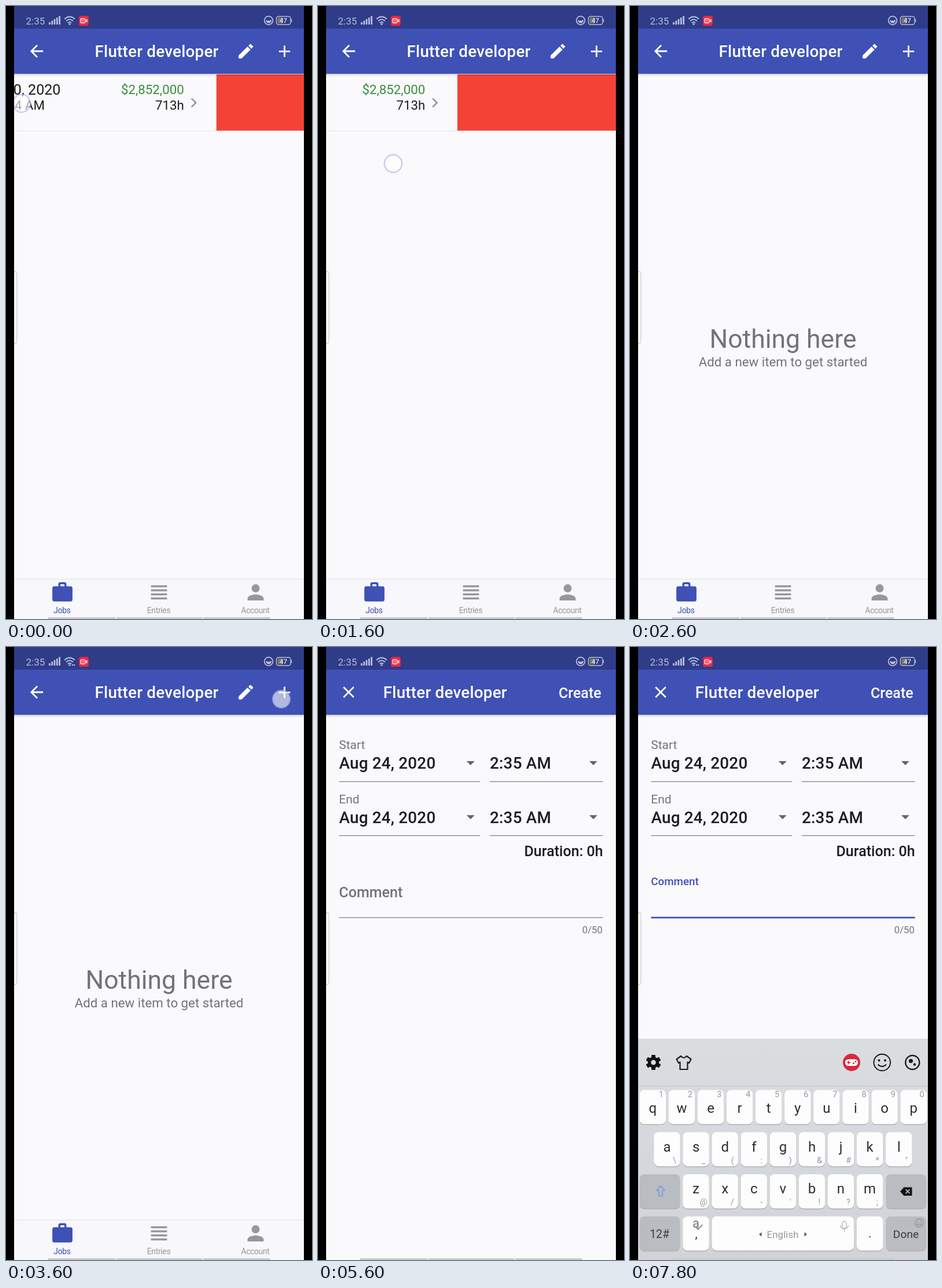
An HTML page for the animation above (8 s loop, 529 px wide and 1058 px high).

```html
<!DOCTYPE html>
<html lang="en">
<head>
<meta charset="utf-8">
<title>Job entries</title>
<style>
html, body { margin: 0; width: 100%; height: 100%; overflow: hidden; background: #000; }
svg { display: block; width: 100vw; height: 100vh; font-family: Roboto, sans-serif; }
</style>
</head>
<body>
<svg id="stage" viewBox="0 0 529 1058"></svg>
<script>
const LOOP = 8000, STEP = 200;
const DP = 501 / 360;
const PAPER = '#faf9fb', INDIGO = '#3f51b5', GREY = '#737277', INK = '#1c1c1e';

// ---- drawing helpers ----
const esc = s => s.replace(/&/g, '&amp;').replace(/</g, '&lt;');
const text = (x, y, size, s, fill = INK, extra = '') =>
  `<text x="${x}" y="${y}" font-size="${size}" fill="${fill}" ${extra}>${esc(s)}</text>`;
const rect = (x, y, w, h, fill, extra = '') =>
  `<rect x="${x}" y="${y}" width="${w}" height="${h}" fill="${fill}" ${extra}/>`;
const circle = (x, y, r, fill, extra = '') =>
  `<circle cx="${x}" cy="${y}" r="${r}" fill="${fill}" ${extra}/>`;
const stroke = (d, color, width, extra = '') =>
  `<path d="${d}" fill="none" stroke="${color}" stroke-width="${width}" ${extra}/>`;
const icon = (x, y, d, fill, scale = DP) =>
  `<path transform="translate(${x} ${y}) scale(${scale}) translate(-12 -12)" d="${d}" fill="${fill}"/>`;
const group = (id, body, extra = '') => `<g id="${id}" ${extra}>${body}</g>`;
const MEDIUM = 'font-weight="500"', MID = 'text-anchor="middle"', END = 'text-anchor="end"';
const TITLE = MEDIUM + ' letter-spacing=".21"';

const ICON = {
  back: 'M20 11H7.83l5.59-5.59L12 4l-8 8 8 8 1.41-1.41L7.83 13H20z',
  add: 'M19 13h-6v6h-2v-6H5v-2h6V5h2v6h6z',
  close: 'M19 6.41 17.59 5 12 10.59 6.41 5 5 6.41 10.59 12 5 17.59 6.41 19 12 13.41 17.59 19 19 17.59 13.41 12z',
  edit: 'M3 17.25V21h3.75L17.81 9.94l-3.75-3.75zM20.71 7.04a1 1 0 0 0 0-1.41l-2.34-2.34a1 1 0 0 0-1.41 0l-1.83 1.83 3.75 3.75z',
  chevron: 'M10 6 8.59 7.41 13.17 12l-4.58 4.59L10 18l6-6z',
  drop: 'M7 10l5 5 5-5z',
  work: 'M20 6h-4V4a2 2 0 0 0-2-2h-4a2 2 0 0 0-2 2v2H4a2 2 0 0 0-2 2v11a2 2 0 0 0 2 2h16a2 2 0 0 0 2-2V8a2 2 0 0 0-2-2zm-6 0h-4V4h4z',
  lines: 'M4 15h16v-2H4zm0 4h16v-2H4zm0-8h16V9H4zm0-6v2h16V5z',
  person: 'M12 12a4 4 0 1 0 0-8 4 4 0 0 0 0 8zm0 2c-2.67 0-8 1.34-8 4v2h16v-2c0-2.66-5.33-4-8-4z'
};

// ---- screens ----
const appBar = () =>
  rect(14, 0, 501, 117, INDIGO) + rect(14, 0, 501, 39, '#2f3c88') +
  rect(14, 117, 501, 1, '#cfcddd') + rect(14, 118, 501, 4, 'url(#shade)');

function statusBar() {
  const c = '#b8bddd';
  let s = text(34.5, 32, 17, '2:35', c);
  for (let i = 0; i < 5; i++) s += rect(74 + i * 4.3, 28 - i * 2.7, 2.8, 4 + i * 2.7, c);
  s += stroke('M101 22.5Q110 14.5 119 22.5M104 26Q110 20.5 116 26M107 29.2Q110 26.6 113 29.2', c, 2);
  s += circle(110, 31.3, 1.6, c);
  s += group('netDots', circle(115, 31, 1.3, c) + circle(118, 31, 1.3, c));
  s += rect(126, 17, 17, 17, '#f4243f', 'rx="4"');
  s += rect(129.2, 22, 7.6, 7, 'none', 'rx="1" stroke="#fff" stroke-width="1.3"');
  s += `<path d="M137 25.5 140.4 22.3V28.7z" fill="#fff"/>` + circle(133, 25.5, 1.2, '#fff');
  s += circle(454, 25, 7.3, 'none', `stroke="${c}" stroke-width="1.8"`);
  s += `<path d="M449.5 24Q454 27 458.5 23.5A4.7 4.7 0 1 1 449.5 24z" fill="${c}"/>`;
  s += rect(467.5, 18, 24.5, 14, 'none', `rx="3.5" stroke="${c}" stroke-width="1.4"`);
  s += rect(469.5, 20, 9.5, 10, '#76795f', 'rx="1.5"') + rect(492.6, 22.5, 1.6, 5, c);
  return s + text(479.5, 29.2, 11.5, '47', '#e3e5f2', MID + ' ' + MEDIUM);
}

function tabBar() {
  const tab = (x, d, label, fill) => icon(x, 1012, d, fill, 1.74) +
    text(x - 0.5, 1048, 13.92, label, fill, MID + ' letter-spacing="-.33"');
  return rect(14, 988.5, 501, 70, '#f8f7fb') + rect(14, 988.5, 501, 1, '#e2e1e6') +
    tab(97.5, ICON.work, 'Jobs', INDIGO) +
    tab(264.5, ICON.lines, 'Entries', '#98979c') +
    tab(431.5, ICON.person, 'Account', '#98979c');
}

function entryRow() {
  return rect(14, 118, 501, 97, PAPER) +
    text(36.3, 152.7, 25.05, 'Sun', '#98979c') + text(100, 152.7, 25.05, 'Aug 30, 2020') +
    text(36.3, 179, 22.27, '9:34 AM - 2:34 AM') + text(36.3, 200, 16.7, 'new draft') +
    text(459.3, 151.8, 22.27, '$2,852,000', '#388e3c', END) +
    text(459.3, 179.2, 22.27, '713h', INK, END) +
    icon(476, 167, ICON.chevron, '#98979c');
}

function listPage() {
  return rect(14, 0, 501, 1058, PAPER) +
    group('swipe', rect(14, 117, 501, 98, '#f44336', 'id="red"') + group('row', entryRow()) +
      rect(14, 215, 501, 1, '#e6e5ea', 'id="divider"')) +
    group('empty', text(264.5, 590, 44.5, 'Nothing here', GREY, MID) +
      text(264.5, 621.7, 22.27, 'Add a new item to get started', GREY, MID)) +
    appBar() + icon(53, 78, ICON.back, '#fff') +
    text(153.6, 88.3, 27.83, 'Flutter developer', '#fff', TITLE) +
    icon(414.7, 78, ICON.edit, '#fff') + icon(481.5, 78.3, ICON.add, '#fff') + tabBar();
}

function formPage() {
  const field = (x, w, y, value) => text(x, y, 27.83, value, INK, TITLE) +
    icon(x + w - 16.6, y - 10.5, ICON.drop, '#646368') + rect(x, y + 21.3, w, 1.4, '#8d8c91');
  const moment = (label, y) => text(36.3, y, 20.9, label, GREY) +
    field(36.4, 244, y + 34, 'Aug 24, 2020') + field(297, 195.6, y + 34, '2:35 AM');
  return rect(14, 0, 501, 1058, PAPER) + appBar() + icon(53, 78, ICON.close, '#fff') +
    text(112.8, 88.3, 27.83, 'Flutter developer', '#fff', TITLE) +
    text(416, 87.5, 25.05, 'Create', '#fff', MEDIUM) +
    moment('Start', 176.4) + moment('End', 269.5) +
    text(492.7, 361, 25.05, 'Duration: 0h', INK, END + ' ' + MEDIUM) +
    text(36.3, 432, 25.05, 'Comment', GREY, MEDIUM + ' id="label"') +
    rect(36.4, 466.3, 456.3, 1.4, '#8d8c91', 'id="rule"') +
    rect(36.6, 421.5, 2.6, 26.5, '#5478c6', 'id="cursor"') +
    text(491.8, 493.8, 16.7, '0/50', GREY, END);
}

// ---- keyboard, in its resting place ----
function keyboard() {
  const PITCH = 50.1, W = 45.4, H = 59, FN = '#b9bcc1';
  const rowY = [764.5, 837.2, 910, 982.7];
  const key = (x, y, w, fill = '#fdfdfe') =>
    rect(x, y + 1.6, w, H, '#aeb1b6', 'rx="8"') + rect(x, y, w, H, fill, 'rx="8"');
  const row = (letters, hints, x0, y, base, hintBase) => [...letters].map((ch, i) => {
    const x = x0 + i * PITCH;
    return key(x - W / 2, y, W) + text(x, base, 24, ch, '#2d2d2f', MID) +
      text(x + (y < 800 ? 14.5 : 13), hintBase, 14.5, hints[i], '#97989c', MID);
  }).join('');

  let s = rect(14, 676, 501, 420, 'url(#board)') + rect(14, 757.5, 501, 1.2, '#c3c6ca');

  // toolbar
  s += circle(40.5, 717, 7, 'none', 'stroke="#111" stroke-width="5.4"');
  for (let a = 0; a < 360; a += 60)
    s += rect(37.1, 704, 6.8, 6, '#111', `rx="1" transform="rotate(${a} 40.5 717)"`);
  s += stroke('M88 706 80.5 711.5 84 718 86.5 716.5V729H99.5V716.5L102 718 105.5 711.5 98 706Q93 712 88 706z',
    '#1a1a1a', 2.2, 'stroke-linejoin="round"');
  s += circle(383, 717, 15, '#d9293d') + rect(372, 711.5, 22, 11.5, '#fff', 'rx="5.5"') +
    stroke('M375 717.2h6M378 714.2v6', '#d9293d', 1.7) +
    circle(386.5, 718.6, 1.5, '#d9293d') + circle(390, 715.6, 1.5, '#d9293d');
  s += circle(435.8, 717, 14.3, 'none', 'stroke="#1a1a1a" stroke-width="2"') +
    circle(430.5, 713.5, 1.9, '#1a1a1a') + circle(441, 713.5, 1.9, '#1a1a1a') +
    stroke('M428.5 720.5Q435.8 727.5 443 720.5', '#1a1a1a', 1.9);
  s += circle(488.3, 717, 12, 'none', 'stroke="#1a1a1a" stroke-width="2.4"') +
    circle(485.5, 714.5, 3.6, '#1a1a1a') + circle(492, 720.5, 2.2, '#1a1a1a');

  // letters
  s += row('qwertyuiop', '1234567890', 39.3, rowY[0], 804, 777);
  s += row('asdfghjkl', '\\_(:)&#*"', 64, rowY[1], 870.5, 890.5);
  s += row('zxcvbnm', "@/-'!?;", 114, rowY[2], 943.3, 963.3);

  // function keys
  s += key(16.8, rowY[2], 69.6, FN) + key(442.6, rowY[2], 69.6, FN);
  s += stroke('M53 930 46 938H50V947.5H56V938H60z', '#6f9be0', 1.6, 'stroke-linejoin="round"');
  s += `<path d="M467 939.7 473.5 932.5H487.5V947H473.5z" fill="#111"/>` +
    stroke('M476.5 936.2l7 7M483.5 936.2l-7 7', FN, 1.7);
  s += key(16.8, rowY[3], 69.6, FN) + key(91.3, rowY[3], W) + key(141.5, rowY[3], 245.5) +
    key(392, rowY[3], W) + key(442.6, rowY[3], 69.6, FN);
  s += text(51, 1020, 19.3, '12#', '#3b3c3e', MID) + text(477, 1020, 19.2, 'Done', '#3b3c3e', MID);
  s += text(114, 1002, 22, 'a', '#77787c', MID) + stroke('M114 1001.5l4 3.5 7-8', '#77787c', 1.8) +
    text(114.5, 1020, 21, ',', '#2d2d2f', MID) + text(414.8, 1019, 21, '.', '#2d2d2f', MID);
  s += text(264, 1019.5, 16.8, 'English', '#97989c', MID + ' letter-spacing=".1"') +
    `<path d="M227.5 1010v7.4l-4.5-3.7zM301.5 1010v7.4l4.5-3.7z" fill="#55565a"/>`;
  s += rect(367, 991, 7, 12, 'none', 'rx="3.5" stroke="#b6b7bb" stroke-width="1.3"') +
    stroke('M363.8 998a6.7 6.7 0 0 0 13.4 0M370.5 1005v4', '#b6b7bb', 1.3);
  s += circle(500, 994.3, 7.3, 'none', 'stroke="#8d9095" stroke-width="1.3"') +
    circle(497.3, 992.3, 1.1, '#8d9095') + circle(502.7, 992.3, 1.1, '#8d9095') +
    stroke('M495.8 996Q500 1001.5 504.2 996z', '#8d9095', 1.2);
  return s;
}

const navHints = [[73, 116], [190.5, 148.5], [340.5, 116]]
  .map(([x, w]) => rect(x, 1055, w, 3, '#c9c9cc')).join('');

document.getElementById('stage').innerHTML = `<defs>
  <linearGradient id="shade" x2="0" y2="1"><stop stop-color="#000" stop-opacity=".1"/><stop offset="1" stop-color="#000" stop-opacity="0"/></linearGradient>
  <linearGradient id="board" x2="0" y2="1"><stop stop-color="#d9dde0"/><stop offset="1" stop-color="#d0d2d7"/></linearGradient>
  <clipPath id="screen">${rect(14, 0, 501, 1058, '#000')}</clipPath></defs>
  ${rect(0, 0, 529, 1058, '#000')}
  <g clip-path="url(#screen)">` +
  group('list', listPage()) + group('form', formPage()) + statusBar() +
  `<path d="M13 458.5h2.5q3.5 0 3.5 4v115.500q0 4.500-3.500 4.500H13" fill="#fcfcfd" stroke="#cfced3" stroke-width="1.3"/>` +
  group('board2', keyboard()) + navHints +
  circle(0, 0, 15.2, 'rgba(255,255,255,.6)', 'id="touch" stroke="rgba(150,158,225,.5)" stroke-width="2.4"') + '</g>';

// ---- motion ----
const el = id => document.getElementById(id);
const part = Object.fromEntries(['red', 'row', 'divider', 'swipe', 'empty', 'form', 'label', 'rule',
  'cursor', 'board2', 'touch', 'netDots'].map(id => [id, el(id)]));
const set = (id, attrs) => { for (const k in attrs) part[id].setAttribute(k, attrs[k]); };
const show = (id, on) => set(id, { visibility: on ? 'visible' : 'hidden' });
const ramp = (t, from, length) => Math.min(1, Math.max(0, (t - from) / length));
const easeOut = p => 1 - (1 - p) ** 3;
const mix = (a, b, p) => a + (b - a) * p;

// Interpolates [time, ...values] keys linearly.
function track(keys, t) {
  const i = keys.findIndex(k => k[0] > t);
  if (i < 0) return keys[keys.length - 1].slice(1);
  if (i === 0) return keys[0].slice(1);
  const [a, b] = [keys[i - 1], keys[i]];
  const p = (t - a[0]) / (b[0] - a[0]);
  return a.slice(1).map((v, n) => mix(v, b[n + 1], p));
}

const drag = [[0, 27, 168], [200, 20, 168], [400, 20, 168], [600, 95, 190], [800, 230, 235],
  [1000, 350, 275], [1200, 403, 290], [1400, 300, 284], [1600, 130, 272]];
const slide = [[0, -151.5], [200, -158], [400, -158], [600, -83], [800, -1.2], [1200, -1.2],
  [1400, -104], [1600, -274], [1800, -430], [2000, -501]];

function draw(t) {
  // swiping the entry away
  const [dx] = track(slide, t);
  const height = 98 * (1 - easeOut(ramp(t, 2250, 300)));
  set('row', { transform: `translate(${dx} 0)` });
  set('red', { x: Math.max(14, 515 + dx), width: Math.min(501, -dx), height });
  set('divider', { y: 117 + height });
  show('swipe', t < 2600);
  show('row', t < 2000);
  show('empty', t >= 2600);

  // the form rises and fades in
  const open = ramp(t, 3750, 400);
  set('form', { opacity: open * open, transform: `translate(0 ${264.5 * (1 - easeOut(open))})` });
  show('form', open > 0);

  // comment gains focus
  const focus = easeOut(ramp(t, 6400, 200));
  const focused = focus > 0;
  set('label', { y: mix(432, 411.3, focus), 'font-size': mix(25.05, 18.79, focus), fill: focused ? INDIGO : GREY });
  set('rule', { y: focused ? 465.6 : 466.3, height: focused ? 2.8 : 1.4, fill: focused ? INDIGO : '#8d8c91' });
  show('cursor', focused && (t - 6300) % 1000 < 500);

  // keyboard arrives
  const rise = ramp(t, 6450, 250);
  set('board2', { opacity: mix(0.6, 1, rise), transform: `translate(0 ${382 * (1 - rise) ** 3.02})` });
  show('board2', rise > 0);

  // finger
  const [x, y] = t < 3000 ? track(drag, t) : t < 5000 ? [476, 90] : [190, 440];
  set('touch', { cx: x, cy: y });
  show('touch', t < 1800 || t === 3600 || t === 6400);
  show('netDots', (t >= 3600 && t < 4800) || t >= 7600);
}

function tick() {
  const t = performance.now() % LOOP;
  draw(Math.floor(t / STEP) * STEP);
  requestAnimationFrame(tick);
}
tick();
</script>
</body>
</html>
```
